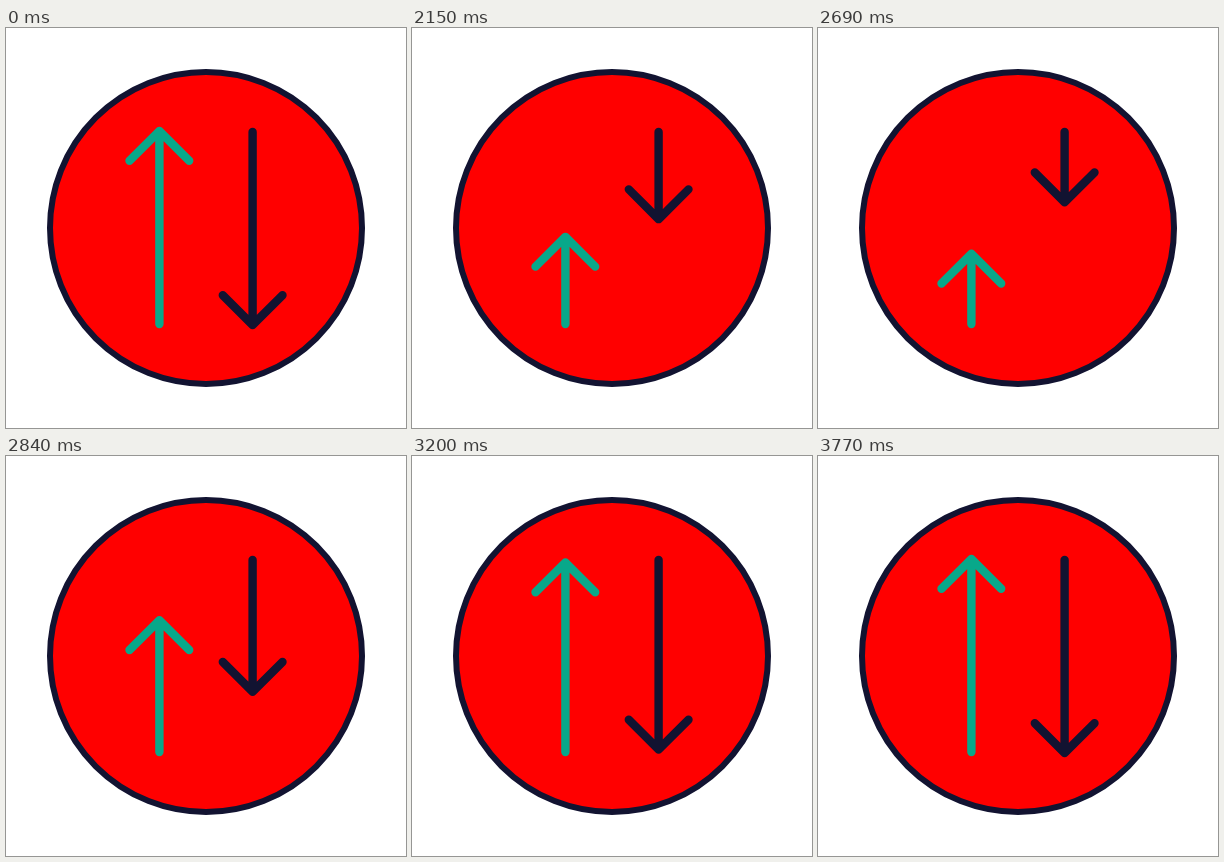
Write an HTML page that moves like this. It is 400x400 px and loops after 3830 ms.

```html
<!DOCTYPE html>
<html lang="en">
<head>
<meta charset="utf-8">
<title>Up and down arrows</title>
<style>
  html, body { margin: 0; width: 100%; height: 100%; overflow: hidden; background: #fff; }
  svg { display: block; width: 100%; height: 100%; }
  path { fill: none; stroke-width: 8.4; stroke-linecap: round; stroke-linejoin: round; }
</style>
</head>
<body>
<svg viewBox="0 0 400 400">
  <circle cx="200" cy="200" r="156" fill="#f00" stroke="#121331" stroke-width="6"/>
  <path stroke="#08a88a"/>
  <path stroke="#121331" transform="rotate(180 200 200)"/>
</svg>
<script>
  const LOOP = 3830, HOLD = 2000, STEP = 30;
  const SHRINK_STEPS = 20, GROW_STEPS = 40, TRAVEL = 148;
  const arrows = document.querySelectorAll('path');

  // Quick start with a long, soft landing
  const ease = x => 1 - Math.exp(-Math.pow(4.62 * x, 1.58));

  function offset(time) {
    const step = Math.max(0, Math.floor((time - HOLD) / STEP));
    return TRAVEL * (step < SHRINK_STEPS
      ? ease(step / SHRINK_STEPS)
      : 1 - ease((step - SHRINK_STEPS) / GROW_STEPS));
  }

  function draw(time) {
    const tip = 103 + offset(time);
    const d = `M153.4 296V${tip}M123.5 ${tip + 29.8}L153.4 ${tip}L183.2 ${tip + 29.8}`;
    arrows.forEach(arrow => arrow.setAttribute('d', d));
  }

  const start = performance.now();
  function tick() {
    draw((performance.now() - start) % LOOP);
    requestAnimationFrame(tick);
  }
  tick();
</script>
</body>
</html>
```
